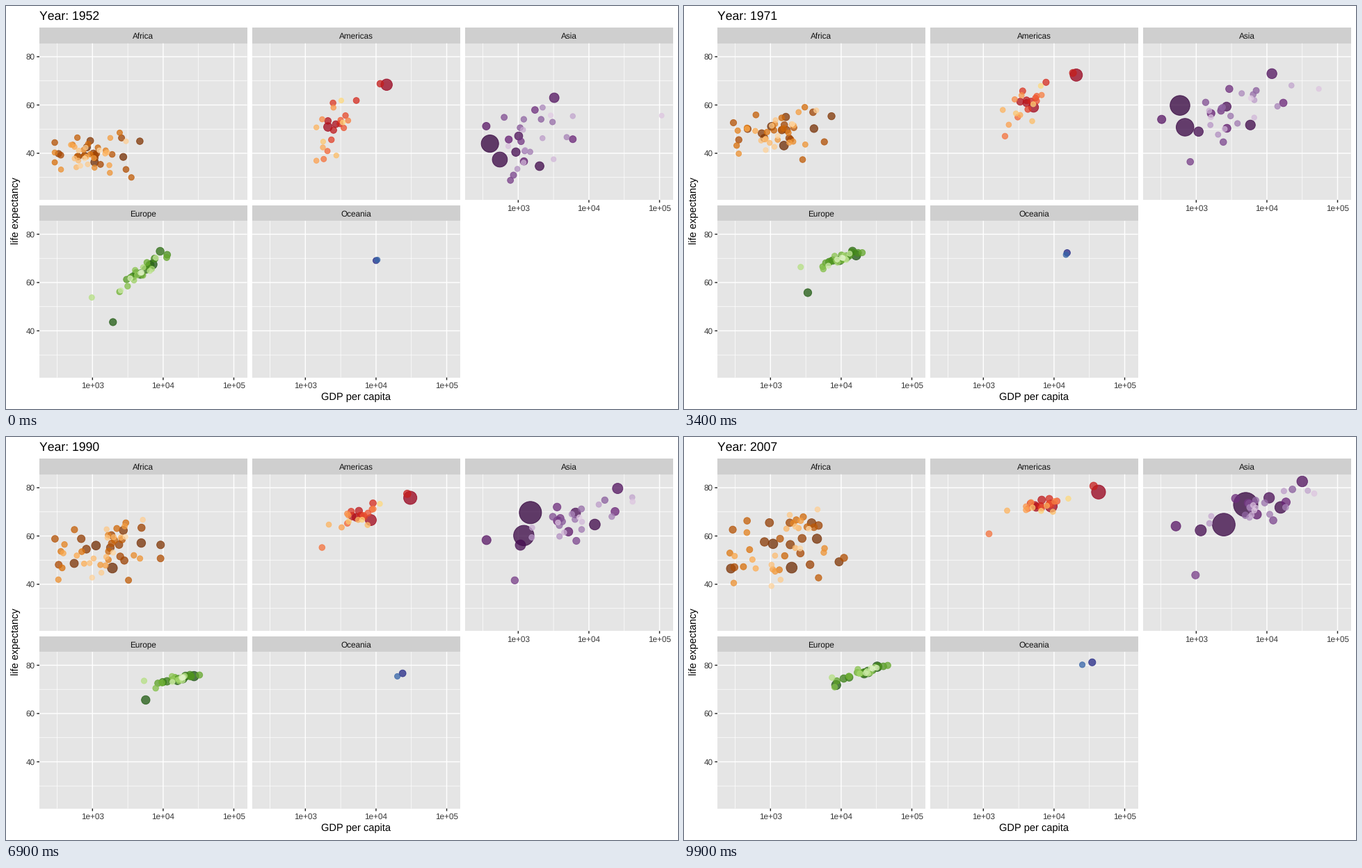
A matplotlib script for the animation above (10 s loop, 966x580 px).

```python
import numpy as np
import matplotlib.pyplot as plt
from matplotlib.animation import FuncAnimation
from matplotlib.colors import to_rgb
from matplotlib.patches import Rectangle

W, H, DPI = 966, 580, 96
FRAMES, INTERVAL = 100, 100
YEAR0, YEAR1 = 1952, 2007

PANEL_W, PANEL_H, STRIP_H = 298.67, 225.5, 22.3
COLS, ROWS = (48, 354, 660), (53.7, 309.2)
X_MIN, X_MAX = 2.2487, 5.1887      # log10 of GDP per capita
Y_MIN, Y_MAX = 20.65, 85.55        # life expectancy
POP_MAX = 1318.7                   # millions
DRIFT = 0.8                        # how far dots change places, radians

plt.rcParams.update({"font.family": "Liberation Sans",
                     "text.hinting": "none", "text.kerning_factor": 6})
fig = plt.figure(figsize=(W / DPI, H / DPI), dpi=DPI, facecolor="white")
ax = fig.add_axes([0, 0, 1, 1])
ax.set(xlim=(0, W), ylim=(H, 0))
ax.axis("off")


def px(log_gdp, col):
    return COLS[col] + (log_gdp - X_MIN) / (X_MAX - X_MIN) * PANEL_W


def py(life, row):
    return ROWS[row] + (Y_MAX - life) / (Y_MAX - Y_MIN) * PANEL_H


def line(x0, y0, x1, y1, color="white", lw=1.067):
    ax.plot([x0, x1], [y0, y1], color=color, lw=lw, snap=False,
            solid_capstyle="butt", zorder=2)


def label(x, y, text, size=8.8, color="black", ha="center", **kw):
    return ax.text(x, y, text, fontsize=size, color=color, ha=ha,
                   va="baseline", zorder=4, **kw)


def box(x, y, w, h, color):
    ax.add_patch(Rectangle((x, y), w, h, fc=color, ec="none", zorder=1))


def draw_panel(name, col, row, x_axis):
    x0, y0 = COLS[col], ROWS[row]
    x1, y1 = x0 + PANEL_W, y0 + PANEL_H
    box(x0, y0, PANEL_W, PANEL_H, "#e5e5e5")
    box(x0, y0 - STRIP_H, PANEL_W, STRIP_H, "#cfcfcf")
    label((x0 + x1) / 2, y0 - 6.7, name, color="#111111")
    for v in (30, 50, 70):
        line(x0, py(v, row), x1, py(v, row), lw=0.533)
    for v in (2.5, 3.5, 4.5):
        line(px(v, col), y0, px(v, col), y1, lw=0.533)
    for v in (40, 60, 80):
        y = py(v, row)
        line(x0, y, x1, y)
        if col == 0:
            line(x0 - 3.67, y, x0, y, "#222222")
            label(x0 - 6.6, y + 4.2, str(v), color="#393939", ha="right")
    for v in (3, 4, 5):
        x = px(v, col)
        line(x, y0, x, y1)
        if x_axis:
            line(x, y1, x, y1 + 3.67, "#222222")
            label(x, y1 + 15.2, f"1e+0{v}", color="#393939")


def ramp(stops, n):
    rgb = np.array([to_rgb("#" + s) for s in stops.split()]) ** 1.2
    t = np.linspace(0, len(rgb) - 1, n)
    return np.column_stack([np.interp(t, range(len(rgb)), c) for c in rgb.T])


def curve(start, mid, end, u):
    """Parabola through three values at u = 0, 0.5 and 1."""
    start, mid, end = map(np.asarray, (start, mid, end))
    bend = 2 * (start - 2 * mid + end)
    return start + (end - start - bend) * u + bend * u * u


class Region:
    """One facet; dots run from most to least populous.

    The cloud gives (mean log GDP, spread, mean life, life gained per unit
    of income, scatter) at the start, middle and end. Leads replace single
    dots, by rank: (first and last population, three path points).
    """

    def __init__(self, name, col, row, stops, n, cloud=None, seed=0,
                 pop=(1, 0, 1), leads=None, x_axis=False):
        draw_panel(name, col, row, x_axis)
        self.col, self.row = col, row
        self.cloud, self.leads = cloud, leads or {}
        rng = np.random.default_rng(seed)
        self.noise = np.clip(rng.normal(size=(4, n)), -1.8, 1.8)

        top, decay, growth = pop
        last = top * np.exp(-decay * np.arange(n))
        pops = np.array([last / growth, last])
        for rank, lead in self.leads.items():
            pops[:, rank] = lead[:2]
        self.sizes = 2 + 10 * np.sqrt(pops / POP_MAX)
        self.dots = ax.scatter(np.zeros(n), np.zeros(n), c=ramp(stops, n),
                               alpha=0.75, lw=0.71, zorder=3)

    def positions(self, u):
        a, b, c, d = self.noise
        x, life = np.zeros_like(a), np.zeros_like(a)
        if self.cloud:
            mean, spread, level, slope, scatter = curve(*self.cloud, u)
            cos, sin = np.cos(DRIFT * u), np.sin(DRIFT * u)
            income, health = a * cos + b * sin, c * cos + d * sin
            x = mean + spread * income
            life = level + slope * income + scatter * health
        for rank, lead in self.leads.items():
            x[rank], life[rank] = curve(*lead[2:], u)
        return np.column_stack([px(x, self.col), py(life, self.row)])

    def show(self, u):
        size = (1 - u) * self.sizes[0] + u * self.sizes[1]
        self.dots.set_offsets(self.positions(u))
        self.dots.set_sizes((0.75 * (size * 2.845 + 0.945)) ** 2)


regions = [
    Region("Africa", 0, 0, "7f3b08 b35806 e08214 fdb863 fee0b6", 52, seed=4,
           cloud=((2.97, 0.28, 39, 1.2, 4.6),
                  (3.14, 0.34, 51.3, 3, 5),
                  (3.19, 0.40, 55, 4.5, 7.5)),
           pop=(90, 0.09, 3.6),
           leads={0: (33, 135, (3.03, 36.3), (3.24, 45.2), (3.30, 46.9)),
                  3: (14, 65, (2.89, 39.1), (2.86, 48), (2.44, 46.5)),
                  4: (14, 44, (3.67, 45), (3.92, 57), (3.97, 49.3)),
                  19: (4, 12, (3.55, 30), (3.46, 39.7), (3.68, 42.7))}),
    Region("Americas", 1, 0, "a50026 d73027 f46d43 fdae61 fee090", 25, seed=7,
           cloud=((3.48, 0.18, 52.5, 3.5, 7),
                  (3.76, 0.20, 66, 3.5, 3.5),
                  (3.88, 0.23, 73.5, 2, 2)),
           pop=(60, 0.165, 2.6),
           leads={0: (158, 301, (4.15, 68.4), (4.39, 74), (4.63, 78.2)),
                  1: (57, 190, (3.32, 50.9), (3.83, 62.5), (3.96, 72.4)),
                  5: (15, 33, (4.06, 68.8), (4.35, 75.2), (4.56, 80.7)),
                  14: (3, 8, (3.26, 37.6), (3.29, 50.9), (3.08, 60.9))}),
    Region("Asia", 2, 0, "40004b 762a83 9970ab c2a5cf e7d4e8", 33, seed=3,
           cloud=((3.16, 0.34, 46.5, 4, 7.5),
                  (3.62, 0.48, 61.5, 5.5, 4.5),
                  (3.84, 0.46, 71.5, 4.5, 3)),
           pop=(240, 0.17, 2.8), x_axis=True,
           leads={0: (556, 1318, (2.60, 44), (2.92, 65), (3.70, 73)),
                  1: (372, 1110, (2.74, 37.4), (2.93, 55.5), (3.39, 64.7)),
                  5: (86, 127, (3.51, 63), (4.25, 76.4), (4.50, 82.6)),
                  12: (8, 32, (2.89, 28.8), (2.93, 39.1), (2.99, 43.8)),
                  31: (0.2, 2.5, (5.03, 55.6), (4.66, 70.5), (4.67, 77.6))}),
    Region("Europe", 0, 1, "276419 4d9221 7fbc41 b8e186 e6f5d0", 30, seed=5,
           cloud=((3.73, 0.20, 65.7, 4, 2),
                  (4.13, 0.17, 72.5, 1.4, 1),
                  (4.37, 0.22, 77.8, 2.3, 1)),
           pop=(85, 0.16, 1.2), x_axis=True,
           leads={0: (69, 82, (3.85, 67.5), (4.33, 73.1), (4.51, 79.4)),
                  1: (22, 71, (3.29, 43.6), (3.63, 60.5), (3.93, 71.8)),
                  23: (2.8, 4.5, (2.99, 53.8), (3.58, 70.3), (3.87, 74.9))}),
    Region("Oceania", 1, 1, "313695 4575b4", 2, x_axis=True,
           leads={0: (8.7, 20.4, (4.00, 69.1), (4.27, 74.1), (4.54, 81.2)),
                  1: (2, 4.1, (4.02, 69.4), (4.23, 73), (4.40, 80.2))}),
]
title = label(48, 20, "", size=13.2, ha="left")
label(503.3, 567, "GDP per capita", size=11)
label(18, 294.2, "life expectancy", size=11, rotation=90,
      rotation_mode="anchor")


def update(i):
    u = i / (FRAMES - 1)
    title.set_text(f"Year: {YEAR0 + (YEAR1 - YEAR0) * u:.0f}")
    for region in regions:
        region.show(u)
    return [title] + [r.dots for r in regions]


anim = FuncAnimation(fig, update, frames=FRAMES, interval=INTERVAL, repeat=True)
plt.show()
```
